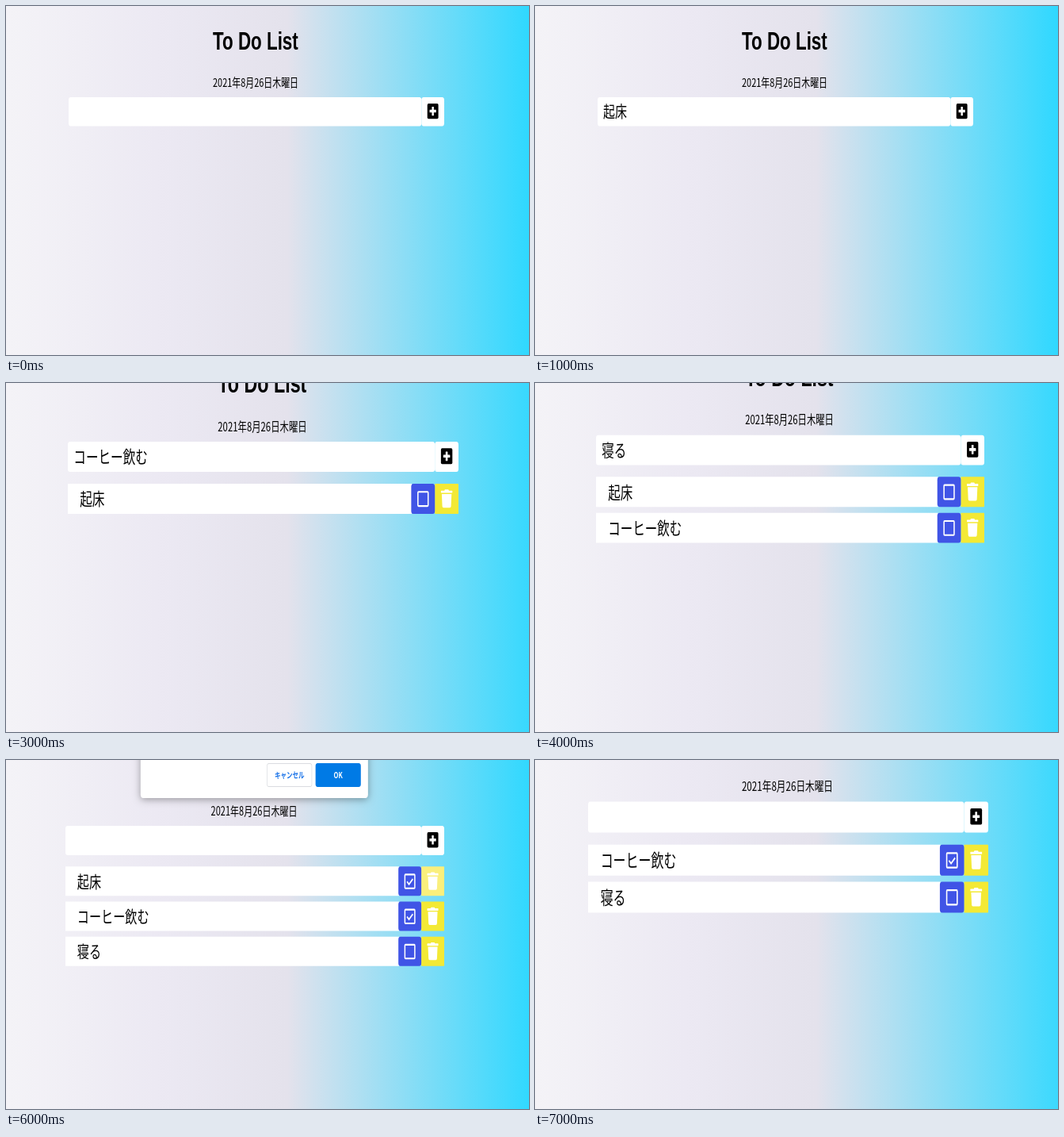
An HTML page with a canvas that plays this animation: 660 px wide and 440 px high, repeating every 8 s.

```html
<!DOCTYPE html>
<html lang="ja">
<head>
<meta charset="utf-8">
<title>To Do List</title>
<style>
html, body { margin: 0; width: 100%; height: 100%; overflow: hidden; }
canvas { display: block; }
</style>
</head>
<body>
<canvas id="stage" width="660" height="440"></canvas>
<script>
const ctx = document.getElementById('stage').getContext('2d');
const SCENE_MS = 1000;
const PAGE_WIDTH = 711, ROW_HEIGHT = 39.5, ROW_PITCH = 47.4, LIST_TOP = 55;
const SQUEEZE = 0.72;            // the page is shown narrower than it is laid out
const ICON_SCALE = 0.0465;
const BLUE = '#4054e6', YELLOW = '#f3e935';
const JP = '"Noto Sans CJK JP", "Noto Sans CJK", sans-serif';
const TRASH = new Path2D('M432 32H312l-9-19A24 24 0 0 0 281 0H167a24 24 0 0 0-22 13L136 32H16A16 16 0 0 0 0 48v32a16 16 0 0 0 16 16h416a16 16 0 0 0 16-16V48a16 16 0 0 0-16-16zM53 467a48 48 0 0 0 48 45h246a48 48 0 0 0 48-45L416 128H32z');

const wake = '起床', coffee = 'コーヒー飲む', sleep = '寝る';

// x, y, w: place of the input row on the stage
const scenes = [
  { x: 79, y: 115, w: 474, input: '', items: [] },
  { x: 79, y: 115, w: 474, input: wake, items: [] },
  { x: 78, y: 82, w: 496, input: '', items: [wake] },
  { x: 78, y: 74, w: 493, input: coffee, items: [wake] },
  { x: 77, y: 65.7, w: 490, input: sleep, items: [wake, coffee] },
  { x: 60.5, y: 45, w: 512, input: '', items: [wake, coffee, sleep], done: [wake, coffee] },
  { x: 75, y: 83, w: 478, input: '', items: [wake, coffee, sleep], done: [wake, coffee], dialog: true },
  { x: 67, y: 52.5, w: 505, input: '', items: [coffee, sleep], done: [coffee] }
];

function box(x, y, w, h, radius, color) {
  ctx.fillStyle = color;
  ctx.beginPath();
  ctx.roundRect(x, y, w, h, radius);
  ctx.fill();
}

function text(string, x, y, font, color = '#000', align = 'left') {
  ctx.font = font;
  ctx.fillStyle = color;
  ctx.textAlign = align;
  ctx.fillText(string, x, y);
}

// Runs draw in a 448 x 512 icon grid centred on (x, y).
function icon(x, y, draw) {
  ctx.save();
  ctx.translate(x, y);
  ctx.scale(ICON_SCALE, ICON_SCALE);
  ctx.translate(-224, -256);
  draw();
  ctx.restore();
}

function drawPlus() {
  box(0, 32, 448, 448, 48, '#000');
  box(92, 216, 264, 80, 12, '#fff');
  box(184, 124, 80, 264, 12, '#fff');
}

function drawCheckbox(checked) {
  ctx.strokeStyle = '#fff';
  ctx.lineWidth = 48;
  ctx.beginPath();
  ctx.roundRect(24, 56, 400, 400, 24);
  if (checked) {
    ctx.moveTo(108, 262);
    ctx.lineTo(190, 342);
    ctx.lineTo(344, 188);
  }
  ctx.stroke();
}

function drawTrash() {
  ctx.fillStyle = '#fff';
  ctx.fill(TRASH);
}

function drawItem(label, top, checked, pale) {
  box(0, top, 626, ROW_HEIGHT, 0, '#fff');
  box(668, top, 43, ROW_HEIGHT, 1, pale ? '#faef7c' : YELLOW);
  box(625, top, 43, ROW_HEIGHT, 4, BLUE);
  text(label, 22, top + 28.5, '22.5px ' + JP);
  icon(646.5, top + 20, () => drawCheckbox(checked));
  icon(689.5, top + 19.5, drawTrash);
}

function drawDialog() {
  ctx.save();
  ctx.shadowColor = 'rgba(0, 0, 0, 0.35)';
  ctx.shadowBlur = 10;
  ctx.shadowOffsetY = 2;
  box(141, -140, 427, 102.5, 5, '#fff');
  ctx.restore();
  box(378, -84.6, 85, 32, 4, '#dadce0');
  box(379, -83.6, 83, 30, 3, '#fff');
  box(469.5, -84.6, 85, 32, 4, '#007ae5');
  text('キャンセル', 420.5, -64.2, 'bold 11.2px ' + JP, '#1a73e8', 'center');
  text('OK', 512, -64.2, 'bold 11.5px ' + JP, '#fff', 'center');
}

function drawBackground(scale) {
  const end = 662 + (scale - 0.926) * 400;
  const gradient = ctx.createLinearGradient(0, 0, end, 0);
  gradient.addColorStop(0, '#f4f3f7');
  gradient.addColorStop(190 / end, '#ece9f3');
  gradient.addColorStop(355 / end, '#e4e2ec');
  gradient.addColorStop(1, '#2ed8ff');
  ctx.setTransform(1, 0, 0, 1, 0, 0);
  ctx.fillStyle = gradient;
  ctx.fillRect(0, 0, 660, 440);
}

function drawScene({ x, y, w, input, items, done = [], dialog }) {
  const scale = w / (PAGE_WIDTH * SQUEEZE);
  drawBackground(scale);
  ctx.setTransform(scale * SQUEEZE, 0, 0, scale, x, y);
  text('To Do List', 273, -64.5, 'bold 33.6px "Liberation Sans", sans-serif');
  text('2021年8月26日木曜日', 273, -14, '16.4px ' + JP);
  box(0, 0, 668, ROW_HEIGHT, 4, '#fff');
  box(668, 0, 43, ROW_HEIGHT, 4, '#fff');
  text(input, 10.5, 28.5, '22.5px ' + JP);
  icon(689.5, 19, drawPlus);
  items.forEach((label, i) =>
    drawItem(label, LIST_TOP + i * ROW_PITCH, done.includes(label), dialog && i === 0));
  if (dialog) drawDialog();
}

function frame() {
  drawScene(scenes[Math.floor(performance.now() / SCENE_MS) % scenes.length]);
  requestAnimationFrame(frame);
}
frame();
</script>
</body>
</html>
```
